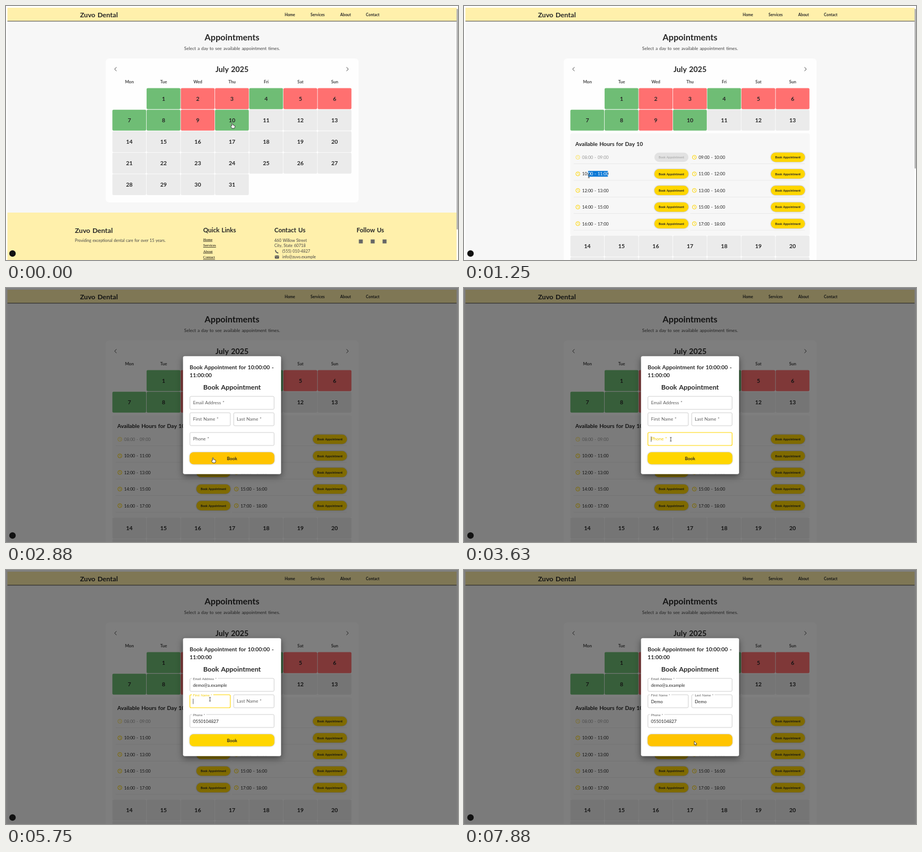
An HTML page for the animation above (8 s loop, 800 by 450 pixels).

```html
<!DOCTYPE html>
<html lang="en">
<head>
<meta charset="utf-8">
<title>Appointments</title>
<style>
html, body { margin: 0; width: 100%; height: 100%; overflow: hidden; background: #fff; }
svg { display: block; width: 800px; height: 450px; }
text { font-family: Lato, "Open Sans", sans-serif; word-spacing: .08em; white-space: pre; }
.serif { font-family: "Liberation Serif", serif; text-decoration: underline; }
#dialog { filter: drop-shadow(0 4px 6px rgba(0, 0, 0, .45)); }
.raised { filter: drop-shadow(0 .8px .8px rgba(0, 0, 0, .35)); }
</style>
</head>
<body>
<svg id="stage" viewBox="0 0 800 450">
  <defs>
    <clipPath id="fold"><rect id="foldBox" x="180" y="222" width="440" height="0"/></clipPath>
    <clipPath id="picked"><rect id="pickedBox" x="219" y="290" width="0" height="14"/></clipPath>
  </defs>
  <g id="page"></g>
  <rect id="dim" width="800" height="450" fill="#000"/>
  <g id="dialog"></g>
  <circle cx="11.5" cy="438.5" r="5.7" fill="#111"/>
  <g id="cursor">
    <path id="hand" d="M-1.6 .8V-3.8q.9-1.4 1.8 0V-1q1.4-.6 1.6.3 1.3-.3 1.4.6 1-.1 1 .9V2.4L3.1 4.8H-1L-3.4 1.2q.6-1.3 1.8-.4z" fill="#fff" stroke="#222" stroke-width=".8"/>
    <path id="beam" d="M-1.5-3.2H1.5M0-3.2V3.2M-1.5 3.2H1.5" fill="none" stroke="#333" stroke-width=".8"/>
    <path id="arrow" d="M-1.5-3.8V3L0 1.7 1.1 4.1 2.2 3.6 1.2 1.3H3.2z" fill="#fff" stroke="#222" stroke-width=".7"/>
  </g>
</svg>
<script>
const $ = id => document.getElementById(id);
const DARK = '#262626', GOLD = '#ffd600', CREAM = '#fff0ab';

function add(parent, tag, attrs) {
  const el = document.createElementNS('http://www.w3.org/2000/svg', tag);
  for (const k in attrs) el.setAttribute(k, attrs[k]);
  return parent.appendChild(el);
}
const box = (p, x, y, width, height, fill, rx = 0, more) =>
  add(p, 'rect', { x, y, width, height, fill, rx, ...more });
const line = (p, d, stroke, w = 1) =>
  add(p, 'path', { d, fill: 'none', stroke, 'stroke-width': w });

// y is the middle of the capitals
function label(p, x, y, str, size, more) {
  const el = add(p, 'text', { x, y: y + size * .36, 'font-size': size, fill: DARK, ...more });
  el.textContent = str;
  return el;
}
const bold = { 'font-weight': 700 };
const mid = { ...bold, 'text-anchor': 'middle' };

// ---------- page ----------
const page = $('page');
box(page, 2.5, 27, 795, 423, '#f7f7f7');
box(page, 2.5, 3, 795, 24, CREAM);
box(page, 2.5, 26.4, 795, 1, '#444');
label(page, 131, 16, 'Zuvo Dental', 12.1, bold);
[['Home', 502.5], ['Services', 551.5], ['About', 601], ['Contact', 649]]
  .forEach(([s, x]) => label(page, x, 15.5, s, 6.8, mid));
label(page, 400, 55.5, 'Appointments', 15.3, mid);
label(page, 400, 75.5, 'Select a day to see available appointment times.', 7.9,
  { 'text-anchor': 'middle', fill: '#444' });

const card = box(page, 176.5, 93, 447.5, 255, '#fefefe', 6);
label(page, 400, 112.5, 'July 2025', 13.4, mid);
line(page, 'M195.6 108.5L192.2 111.8 195.6 115.1', '#444');
line(page, 'M602.6 108.5L606 111.8 602.6 115.1', '#444');
'Mon Tue Wed Thu Fri Sat Sun'.split(' ')
  .forEach((s, i) => label(page, 218.4 + 60.55 * i, 134, s, 7.5, { ...mid, fill: '#444' }));

// the month starts on a Tuesday; rows below the second one move
const low = add(page, 'g', {});
const free = [1, 4, 7, 8, 10], full = [2, 3, 5, 6, 9];
for (let d = 1; d <= 31; d++) {
  const row = Math.floor(d / 7);
  const x = 188.3 + 60.55 * (d % 7), y = 145.6 + 38.05 * row;
  const fill = free.includes(d) ? '#6fbd75' : full.includes(d) ? '#ff7070' : '#ebebeb';
  const home = row < 2 ? page : low;
  box(home, x, y, 59.8, 37.2, fill, 2);
  label(home, x + 30, y + 19, d, 10, mid);
}

// ---------- hours ----------
const hours = add(page, 'g', { 'clip-path': 'url(#fold)' });
box(hours, 188, 225.5, 424, 181, '#f7f7f7', 4);
label(hours, 197, 244, 'Available Hours for Day 10', 9.8, bold);
const hh = n => String(n).padStart(2, '0') + ':00';
for (let i = 0; i < 10; i++) {
  const x = 197 + (i % 2) * 206.2, y = 268 + Math.floor(i / 2) * 29.4, off = i === 0;
  const opacity = off ? .6 : 1;
  add(hours, 'circle', { cx: x + 4.5, cy: y, r: 3.5, fill: 'none', stroke: GOLD, opacity });
  line(hours, `M${x + 4.5} ${y - 2}v2.2l1.5 1`, GOLD, .8).setAttribute('opacity', opacity);
  label(hours, x + 12, y + .3, `${hh(8 + i)} - ${hh(9 + i)}`, 7.6, { fill: off ? '#999' : DARK });
  const b = box(hours, x + 140, y - 8.3, 60.2, 16.6, off ? '#e2e2e2' : GOLD, 8.3);
  if (!off) b.setAttribute('class', 'raised');
  label(hours, x + 170.1, y + .2, 'Book Appointment', 5.3, { ...mid, fill: off ? '#b0b0b0' : DARK });
  box(hours, x - 3, y + 11.2, 203, .6, '#e2e2e2');
}
const sel = add(hours, 'g', { 'clip-path': 'url(#picked)' });
box(sel, 205, 292.2, 49.6, 10.2, '#0a78d6');
label(sel, 209, 297.7, '10:00 - 11:00', 7.6, { fill: '#fff' });

// ---------- footer ----------
box(low, 2.5, 366, 795, 120, CREAM);
label(low, 122, 398, 'Zuvo Dental', 12.1, bold);
label(low, 122, 415.5, 'Providing exceptional dental care for over 15 years.', 7, { fill: '#444' });
[['Quick Links', 349], ['Contact Us', 475], ['Follow Us', 620.5]]
  .forEach(([s, x]) => label(low, x, 397.5, s, 11, bold));
['Home', 'Services', 'About', 'Contact']
  .forEach((s, i) => label(low, 349, 413.3 + 10.5 * i, s, 6.7, { class: 'serif', fill: '#000' }));
label(low, 475, 415, '460 Willow Street', 7.1, { fill: '#444' });
label(low, 475, 424.7, 'City, State 60718', 7.1, { fill: '#444' });
label(low, 489, 434.8, '(555) 010-4827', 7, { fill: '#444' });
label(low, 489, 444.7, 'info@zuvo.example', 7, { fill: '#444' });
line(low, 'M477 432.2q0 4.8 5 5.4', '#555', 1.6);
box(low, 475.8, 442, 7.4, 5.6, '#555', .8);
line(low, 'M476.4 443l3.1 2 3.1-2', CREAM, .7);
[628, 649, 670].forEach(x => box(low, x - 3.5, 413.6, 7, 7, '#666'));
const thumb = box(page, 797.8, 5, 1.6, 391, '#8f8f8f', .8);

// ---------- dialog ----------
const dialog = $('dialog');
box(dialog, 313.3, 120.7, 173.5, 209, '#fff', 3);
label(dialog, 325, 140.8, 'Book Appointment for 10:00:00 -', 9.85, bold);
label(dialog, 325, 154.8, '11:00:00', 9.85, bold);
label(dialog, 400, 176, 'Book Appointment', 12, mid);

const MAIL = 'demo@a.example';
const typed = (word, from, gap) => [...word].map((_, i) => [from + gap * i, word.slice(0, i + 1)]);
const fields = [
  { name: 'Email Address', x: 325.5, y: 192, w: 149, on: 4600, off: 5480, steps: [[4760, 'D'], [5200, MAIL]] },
  { name: 'First Name', x: 325.5, y: 221, w: 71.5, on: 5480, off: 6500, steps: typed('Demo', 5880, 110) },
  { name: 'Last Name', x: 403, y: 221, w: 71.5, on: 6500, off: 7600, steps: typed('Demo', 6750, 110) },
  { name: 'Phone', x: 325.5, y: 256, w: 149, on: 3630, off: 4600, steps: [[4100, '0550104827']] }
];
for (const f of fields) {
  f.frame = box(dialog, f.x, f.y, f.w, 23, 'none', 2);
  f.notch = box(dialog, f.x + 3.5, f.y - 2, 0, 4, '#fff');
  f.tag = label(dialog, f.x + 5.5, f.y + 11.5, f.name + ' *', 8);
  f.text = label(dialog, f.x + 5.5, f.y + 12, '', 7.8);
  f.caret = box(dialog, 0, f.y + 7, .7, 9.5, DARK);
}
const book = box(dialog, 325, 291, 150, 21.3, GOLD, 7, { class: 'raised' });
const bookText = label(dialog, 400, 301.8, 'Book', 7.8, mid);
const hint = add(dialog, 'g', {});
box(hint, 325, 215, 149.2, 8.7, '#272b31', 1);
label(hint, 327.5, 219.3, MAIL, 4.5, { fill: '#fff' });

// ---------- motion ----------
const path = [
  [0, 401, 212], [350, 401, 212], [820, 262, 297], [950, 255, 298], [1250, 221, 301],
  [1500, 221, 301], [2250, 361, 308], [2700, 361, 308], [2880, 367, 305], [3150, 367, 305],
  [3500, 366, 268], [4300, 366, 268], [4600, 369, 209], [4950, 369, 209], [5150, 362, 219],
  [5250, 362, 219], [5480, 361, 229], [6200, 361, 229], [6480, 430, 231], [7150, 430, 231],
  [7550, 409, 307], [8000, 409, 307]
];
const kinds = [
  [0, 'hand'], [430, 'arrow'], [760, 'beam'], [1650, 'arrow'], [2020, 'hand'], [3260, 'beam'],
  [5050, 'arrow'], [5330, 'beam'], [7220, 'arrow'], [7420, 'hand'], [7700, 'arrow']
];
const ramp = (t, from, len) => {
  const p = Math.min(1, Math.max(0, (t - from) / len));
  return p * p * (3 - 2 * p);
};
const within = (t, a, b) => t >= a && t < b;
const show = (el, yes) => { el.style.display = yes ? '' : 'none'; };
const set = (el, attrs) => { for (const k in attrs) el.setAttribute(k, attrs[k]); };
const current = (list, t) => list.filter(s => s[0] <= t).pop();

function drawField(f, t) {
  const focus = within(t, f.on, f.off), up = ramp(t, f.on, 200);
  const step = current(f.steps, t), size = 8 - 2 * up;
  set(f.frame, { stroke: focus ? GOLD : '#c4c4c4', 'stroke-width': focus ? 1.1 : .8 });
  set(f.tag, {
    'font-size': size, y: f.y + 11.5 - 10.8 * up + size * .36,
    fill: focus ? '#f2cb00' : '#5c5c5c'
  });
  set(f.notch, { width: up ? up * (f.tag.getComputedTextLength() + 4) : 0 });
  f.text.textContent = step ? step[1] : '';
  const since = t - Math.max(f.on, step ? step[0] : 0);
  show(f.caret, focus && since % 1000 < 500);
  set(f.caret, { x: f.x + 5.3 + (step ? f.text.getComputedTextLength() + .4 : 0) });
}

function draw(t) {
  const open = ramp(t, 200, 320), shift = 185 * open;
  set(low, { transform: `translate(0 ${shift})` });
  set(card, { height: 255 + shift });
  set($('foldBox'), { height: shift });
  set(thumb, { height: 391 - 108 * open });

  const left = 255 - 35.3 * ramp(t, 950, 280);
  set($('pickedBox'), { x: left, width: within(t, 950, 1650) ? 255 - left : 0 });

  const fade = ramp(t, 2640, 225);
  set($('dim'), { opacity: .5 * fade });
  set(dialog, { opacity: fade });
  show(dialog, fade > 0);
  show(thumb, fade === 0);
  fields.forEach(f => drawField(f, t));
  show(hint, within(t, 4760, 5200));
  set(book, { fill: within(t, 2640, 3260) || t > 7420 ? '#ffc400' : GOLD });
  show(bookText, t < 7720);

  const i = Math.max(1, path.findIndex(p => p[0] > t)), a = path[i - 1], b = path[i];
  const k = ramp(t, a[0], b[0] - a[0]);
  set($('cursor'), { transform: `translate(${a[1] + (b[1] - a[1]) * k} ${a[2] + (b[2] - a[2]) * k})` });
  const kind = current(kinds, t)[1];
  ['hand', 'beam', 'arrow'].forEach(id => show($(id), id === kind));
}

function tick() {
  draw(performance.now() % 8000);
  requestAnimationFrame(tick);
}
draw(0);
requestAnimationFrame(tick);
</script>
</body>
</html>
```
